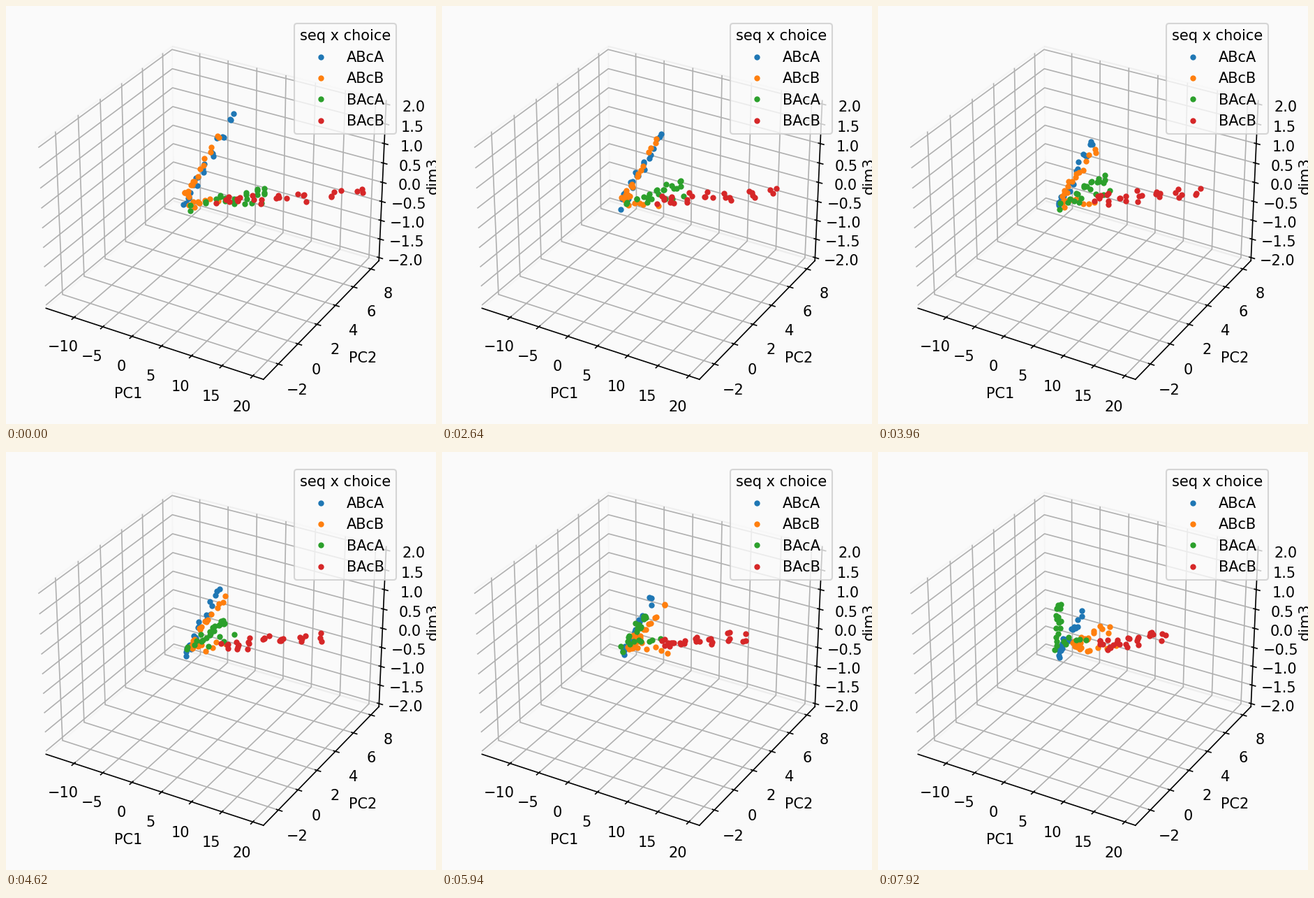
A matplotlib script for the animation above (8000 ms loop, 616 px wide and 598 px high).

```python
import numpy as np
import matplotlib.pyplot as plt
from matplotlib.animation import FuncAnimation

W, H, DPI = 616, 598, 150
INTERVAL, LOOP, STEP_MS = 80, 8000, 660
LAST_STEP = LOOP // STEP_MS
CLUSTERS = 7
NOISE = np.array([[2.0], [4.5]])
BACKGROUND = "#fafafa"

plt.rcParams.update({
    "font.family": "DejaVu Sans",
    "font.size": 10,
    "figure.facecolor": BACKGROUND,
    "axes.facecolor": BACKGROUND,
})

# Each streak: number of dots, easing power, then its dense and its sparse end
# in screen pixels, as (first position, last position).
GROUPS = {
    "ABcA": ("tab:blue", [
        (24, 1, ((258, 278), (261, 285)), ((322, 162), (290, 233))),
    ]),
    "ABcB": ("tab:orange", [
        (17, 2, ((259, 273), (280, 272)), ((303, 187), (331, 252))),
        (9, 2, ((262, 281), (283, 276)), ((302, 277), (341, 282))),
    ]),
    "BAcA": ("tab:green", [
        (18, 1.2, ((370, 269), (259, 217)), ((264, 285), (255, 283))),
        (6, 1, ((300, 280), (262, 270)), ((388, 279), (306, 259))),
    ]),
    "BAcB": ("tab:red", [
        (27, 1, ((311, 278), (319, 276)), ((509, 267), (410, 263))),
    ]),
}


def travel(path, share):
    start, end = np.array(path, dtype=float)
    return (start + (end - start) * share)[:, None]


def streak(count, power, dense, sparse, seed, step):
    """Dots bunched along a moving line, with fresh noise at every step."""
    share = (step / LAST_STEP) ** power
    offset = np.random.default_rng(seed).normal(0, 0.02, count)
    along = (np.arange(count) % CLUSTERS / (CLUSTERS - 1)) ** 1.3 + offset
    a, b = travel(dense, share), travel(sparse, share)
    rng = np.random.default_rng([seed, step])
    return a + (b - a) * along + NOISE * np.clip(rng.normal(size=(2, count)), -1.8, 1.8)


def make_space(fig):
    side, left, top = 554.4, 15.5, 14.7
    ax = fig.add_axes([left / W, (H - top - side) / H, side / W, side / H],
                      projection="3d")
    ax.set(xlim=(-14.95, 21.7), ylim=(-3.485, 8.945), zlim=(-25 / 12, 25 / 12),
           xticks=range(-10, 21, 5), yticks=range(-2, 9, 2),
           zticks=np.arange(-2, 2.1, 0.5), xlabel="PC1", ylabel="PC2")
    ax.set_zlabel("dim3", rotation=90, labelpad=0.4)
    for axis in (ax.xaxis, ax.yaxis, ax.zaxis):
        axis.pane.fill = False
    return ax


fig = plt.figure(figsize=(W / DPI, H / DPI), dpi=DPI)
space = make_space(fig)

screen = fig.add_axes([0, 0, 1, 1])
screen.set(xlim=(0, W), ylim=(H, 0))
screen.axis("off")

dots = [screen.plot([], [], ".", color=color, label=name)[0]
        for name, (color, _) in GROUPS.items()]
space.legend(handles=dots, title="seq x choice", loc="upper right")


def update(frame):
    # The step is read at the end of the frame, so changes never come late.
    step = (frame * INTERVAL + INTERVAL - 1) // STEP_MS
    for i, (line, (_, streaks)) in enumerate(zip(dots, GROUPS.values())):
        parts = [streak(*spec, seed=10 * i + j, step=step)
                 for j, spec in enumerate(streaks)]
        line.set_data(*np.hstack(parts))
    return dots


animation = FuncAnimation(fig, update, frames=LOOP // INTERVAL,
                          init_func=lambda: update(0), interval=INTERVAL,
                          repeat=True, repeat_delay=0)
plt.show()
```
